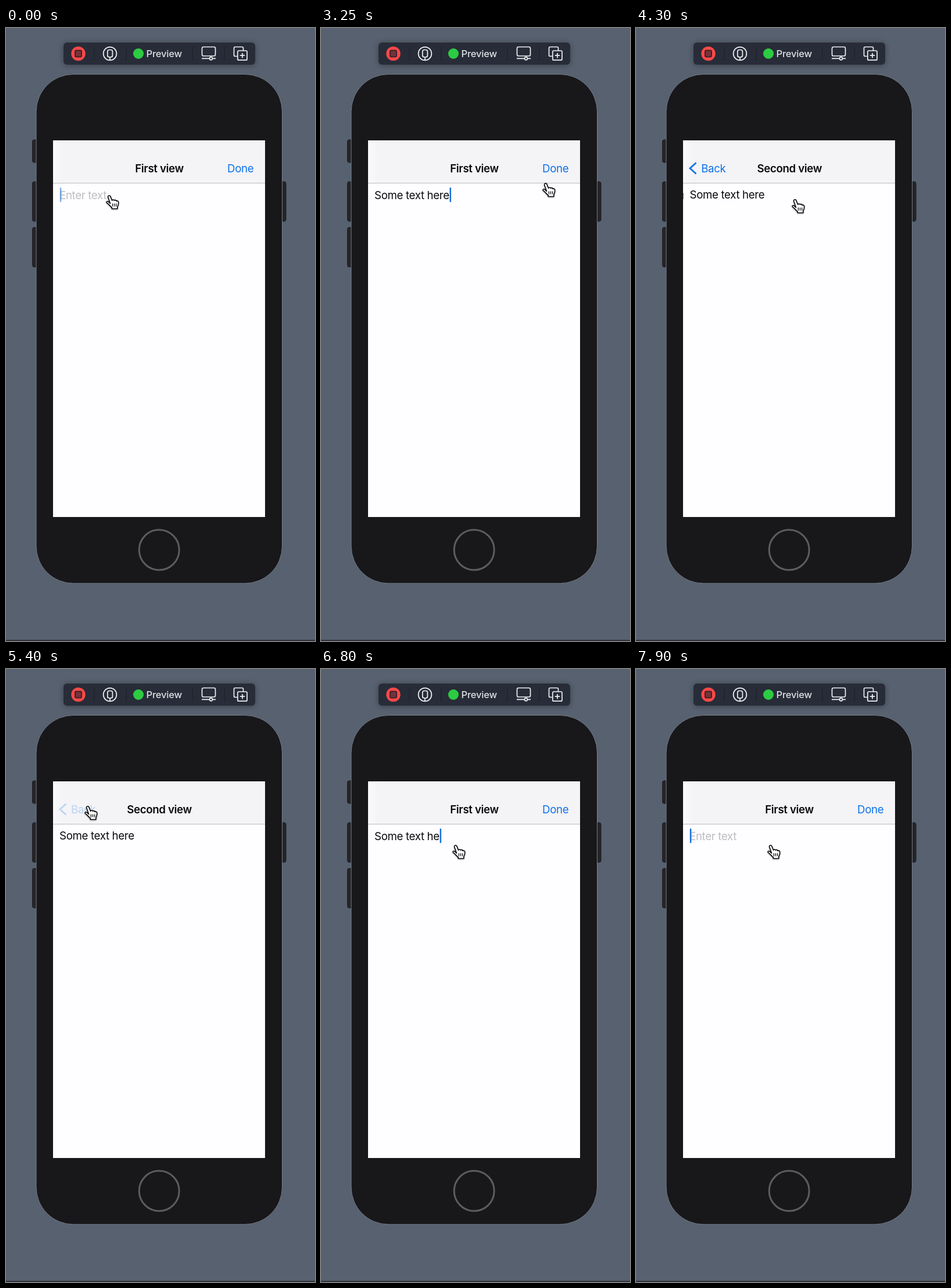
Animation, 532 px wide and 1053 px high, one loop 8000 ms. Source, as an HTML page:

```html
<!DOCTYPE html>
<html lang="en">
<head>
<meta charset="utf-8">
<title>Two views</title>
<style>
html, body { margin: 0; width: 100%; height: 100%; overflow: hidden; background: #57616f; }
svg { display: block; width: 100vw; height: 100vh; }
text { font: 18.7px Inter, "Liberation Sans", sans-serif; letter-spacing: -.35px; white-space: pre; fill: #0a090c; }
.title { font-weight: 600; text-anchor: middle; }
.blue { fill: #0d72ea; }
.icon { fill: none; stroke: #eef0f3; stroke-width: 1.7; }
</style>
</head>
<body>
<svg viewBox="0 0 532 1053">
  <defs>
    <clipPath id="screen"><rect x="81" y="193" width="365" height="647"/></clipPath>
    <linearGradient id="bar">
      <stop offset="0" stop-color="#f9f8fa"/>
      <stop offset=".05" stop-color="#f4f3f6"/>
    </linearGradient>
  </defs>
  <rect width="532" height="1053" fill="#57616f"/>
  <rect y="1051" width="532" height="2" fill="#2f323b"/>

  <!-- toolbar -->
  <rect x="99" y="25" width="330" height="38" rx="6" fill="#272c38" style="filter:drop-shadow(0 1px 5px #0005)"/>
  <path d="M152 32v24M207 32v24M321 32v24M376 32v24" stroke="#1f232d" stroke-width="1.5"/>
  <circle cx="124.5" cy="44" r="12.2" fill="#fb4848"/>
  <rect x="119" y="38.5" width="11" height="11" rx="2" fill="#74333a" stroke="#3f2029" stroke-width="2"/>
  <g class="icon">
    <circle cx="179" cy="44" r="11.4"/>
    <rect x="174.8" y="37.5" width="8.6" height="12.5" rx="3"/>
    <path d="M179 50v5"/>
    <rect x="337.5" y="32.5" width="23" height="15.5" rx="2.5"/>
    <path d="M337 52.3h13M356 52.3h5"/>
    <circle cx="353" cy="52.3" r="2.5"/>
    <path d="M398.5 48.5h-4a2 2 0 0 1-2-2v-12a2 2 0 0 1 2-2h12a2 2 0 0 1 2 2v4.500"/>
    <rect x="398.800" y="39" width="16.200" height="16.200" rx="2"/>
    <path d="M407 43v8.400M402.800 47.200h8.400"/>
  </g>
  <circle cx="228" cy="44" r="9" fill="#2ccb43"/>
  <text x="241.500" y="50" style="font-size:16.500px;font-weight:500;letter-spacing:-.2px;fill:#dee0e4">Preview</text>

  <!-- phone -->
  <g fill="#252528" stroke="#1b1b1e">
    <rect x="45.500" y="192" width="12" height="39" rx="3"/>
    <rect x="45.500" y="264" width="12" height="68" rx="3"/>
    <rect x="45.500" y="342.500" width="12" height="68" rx="3"/>
    <rect x="470" y="264" width="12" height="68" rx="3"/>
  </g>
  <rect x="52" y="79.500" width="423.500" height="874.500" rx="64" fill="#18171a" stroke="#747e8a"/>
  <circle cx="263.700" cy="896.500" r="34.500" fill="none" stroke="#5d5c5f" stroke-width="3"/>

  <g clip-path="url(#screen)">
    <rect x="81" y="193" width="365" height="647" fill="#fefdff"/>
    <g id="first">
      <text id="hint" x="92" y="293.500" style="fill:#bdbcc0">Enter text</text>
      <text id="typed" x="92" y="293.500"></text>
      <rect id="caret" y="274" width="2.500" height="25" rx="1" fill="#1670dc"/>
    </g>
    <rect id="dim" x="81" y="193" width="365" height="647"/>
    <g id="second">
      <rect x="81" y="193" width="365" height="647" fill="#fefdff"/>
      <text x="92" y="292.500">Some text here</text>
    </g>
    <rect x="81" y="193" width="365" height="73" fill="url(#bar)"/>
    <rect x="81" y="266" width="365" height="1" fill="#bbbabd"/>
    <text id="title1" class="title" x="264" y="247.500">First view</text>
    <text id="title2" class="title" x="264" y="247.500">Second view</text>
    <text id="done" class="blue" x="381" y="247.500">Done</text>
    <g id="back">
      <path d="M103.500 231.500L93 241l10.500 9.500" fill="none" stroke="#0d72ea" stroke-width="2.800"/>
      <text id="backLabel" class="blue" x="112" y="247.500">Back</text>
    </g>
  </g>

  <g id="hand" style="filter:drop-shadow(0 1.500px 1px #0006)">
    <path d="M8.500 15.500L4.800 5C3.900 1.800 7.400.4 8.800 3.400L11.600 10.200C12.300 8.400 15 8.700 15.300 10.300C16.400 9 18.600 9.500 18.900 11.300C20.500 10.300 22.600 11.300 22.700 13.500C23 17 21.800 19 20.800 21.300V24.500H11.300V22.500C8.500 20.300 6.500 17.300 3 14.700C.5 12.600 3.500 10.800 5.500 12.600Z"
      fill="#fff" stroke="#08080a" stroke-width="1.600" stroke-linejoin="round"/>
    <path d="M12.400 15.500v5M15.500 15.500v5M18.600 15.500v5" stroke="#08080a" stroke-width="1.300"/>
  </g>
</svg>
<script>
const LOOP = 8000, WIDTH = 365, PHRASE = "Some text here";
const KEY_TIMES = [300, 500, 550, 700, 1050, 1250, 1400, 1650, 1850, 2050, 2450, 2550, 2700, 2850];
const HAND_PATH = [ // time, x, y
  [3050, 171, 286], [3250, 380, 265], [3500, 392, 239], [3850, 392, 239], [4300, 267, 293],
  [4800, 207, 236], [5200, 134, 234], [5700, 134, 234], [6250, 225, 301]
];
const PUSH = 3750, POP = 5600, ERASE = 6650, ERASE_STEP = 85;

const el = id => document.getElementById(id);
const clamp = v => Math.max(0, Math.min(1, v));
const ramp = (t, from, to) => clamp((t - from) / (to - from));
const move = (id, x, y = 0) => el(id).setAttribute("transform", `translate(${x} ${y})`);
const fade = (id, v) => el(id).setAttribute("opacity", v);

// Critically damped spring from 0 to 1
function spring(ms) {
  const k = Math.max(0, ms) * 0.016;
  return 1 - (1 + k) * Math.exp(-k);
}

function handAt(t) {
  const i = HAND_PATH.findIndex(p => p[0] > t);
  if (i < 0) return HAND_PATH.at(-1).slice(1);
  if (i === 0) return HAND_PATH[0].slice(1);
  const a = HAND_PATH[i - 1], b = HAND_PATH[i];
  const u = ramp(t, a[0], b[0]), s = u * u * (3 - 2 * u);
  return [1, 2].map(n => a[n] + (b[n] - a[n]) * s);
}

function lettersAt(t) {
  const typed = KEY_TIMES.filter(k => k <= t).length;
  const erased = t < ERASE ? 0 : Math.floor((t - ERASE) / ERASE_STEP) + 1;
  return Math.max(0, typed - erased);
}

function caretAlpha(t) {
  if (t < 50) return 0.55;
  return t < 300 || (t >= 3700 && t < 6350) ? 0 : 1;
}

function draw(t) {
  const count = lettersAt(t);
  el("typed").textContent = PHRASE.slice(0, count);
  fade("hint", count ? 0 : 1);
  el("caret").setAttribute("x", 92.8 + (count ? el("typed").getComputedTextLength() : 0));
  fade("caret", caretAlpha(t));

  // p: 0 shows the first view, 1 the second
  const p = t < POP ? spring(t - PUSH) : 1 - spring(t - POP);
  move("first", -0.3 * WIDTH * p);
  move("second", WIDTH * (1 - p));
  fade("dim", p > 0 && p < 0.998 ? 0.1 * p : 0);

  move("title1", -130 * p);
  fade("title1", clamp(1 - 1.6 * p));
  move("title2", 182 * (1 - p));
  fade("title2", clamp(1.6 * p - 0.6));
  const donePress = t < POP ? ramp(t, 3550, 3620) : 0;
  fade("done", clamp(1 - 1.6 * p) * (1 - 0.75 * donePress));
  const backPress = ramp(t, 5280, 5380);
  fade("back", clamp(1.6 * p - 0.6) * (1 - 0.77 * backPress));
  move("backLabel", 130 * (1 - p));

  move("hand", ...handAt(t));
}

function frame(now) {
  draw(now % LOOP);
  requestAnimationFrame(frame);
}
draw(0);
requestAnimationFrame(frame);
</script>
</body>
</html>
```
